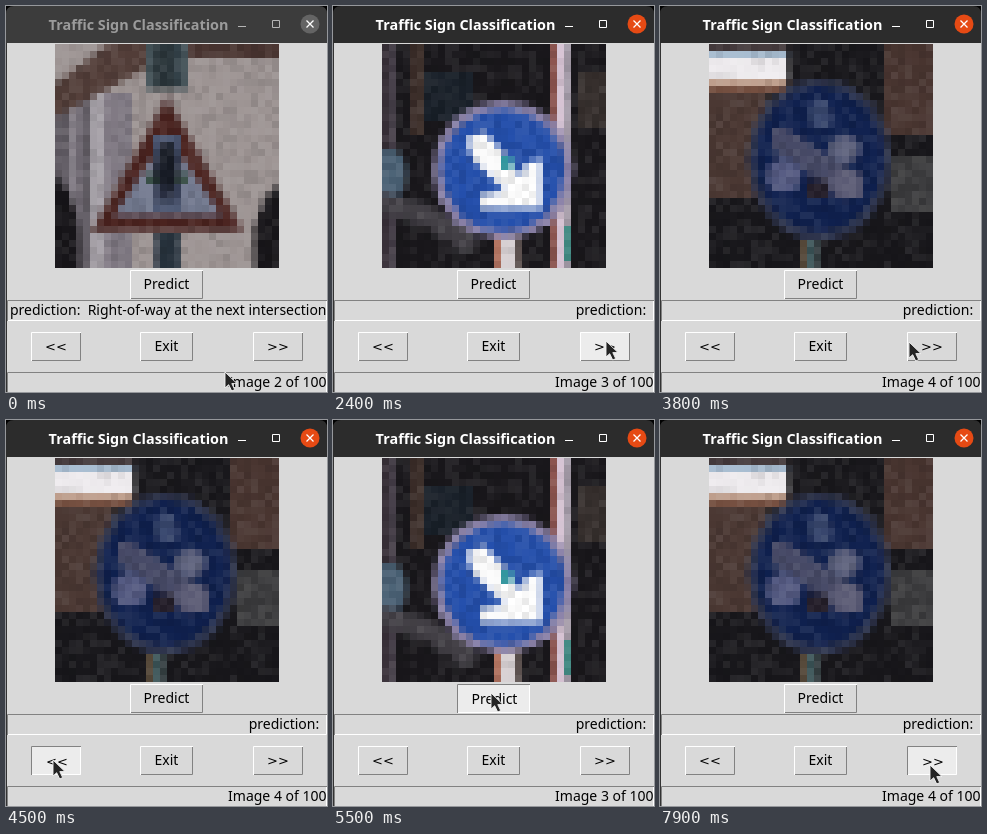
Recreate the animation shown at these times as an HTML page with a canvas. Size 321 by 386 pixels, loop 8 s.

```html
<!DOCTYPE html>
<html lang="en">
<head>
<meta charset="utf-8">
<title>Traffic Sign Classification</title>
<style>
html, body { margin: 0; width: 100%; height: 100%; overflow: hidden; background: #d9d9d9; }
canvas { position: absolute; left: 49px; top: 38px; width: 224px; height: 224px; image-rendering: pixelated; }
svg { position: absolute; left: 0; top: 0; }
text { font: 14px "Noto Sans", sans-serif; white-space: pre; }
.arrows { font: 13px "DejaVu Sans", sans-serif; }
#title { font: bold 14.4px "Noto Sans", sans-serif; }
</style>
</head>
<body>
<canvas id="photo" width="32" height="32"></canvas>
<svg id="ui" width="321" height="386" viewBox="0 0 321 386">
  <rect width="321" height="37" fill="#000"/>
  <path id="bar" d="M0 37V8Q0 0 8 0H313Q321 0 321 8V37Z"/>
  <rect y="37" width="1" height="349" fill="#333"/>
  <text id="title" x="132.5" y="23.5" text-anchor="middle">Traffic Sign Classification</text>
  <g id="icons" fill="none">
    <path d="M232 20.5H240M266.5 14.5H273.5V21.5H266.5Z"/>
    <circle id="close" cx="304" cy="18" r="9.5" stroke="none"/>
    <path d="M300.5 14.5l7 7m0 -7l-7 7" stroke="#fff" stroke-width="1.3"/>
  </g>
</svg>
<script>
const LOOP = 8000, STEP = 100, NS = 'http://www.w3.org/2000/svg';
const $ = id => document.getElementById(id);
const ui = $('ui'), ctx = $('photo').getContext('2d');

function add(tag, attrs, parent = ui) {
  const el = document.createElementNS(NS, tag);
  for (const k in attrs) el.setAttribute(k, attrs[k]);
  return parent.appendChild(el);
}

// Tk style box: a face with two-tone one pixel edges
function box(x, y, w, h) {
  const g = add('g', { fill: 'none' });
  const face = add('rect', { x, y, width: w, height: h, fill: '#d9d9d9' }, g);
  const lead = add('path', { d: `M${x + .5} ${y + h}V${y + .5}H${x + w}` }, g);
  const trail = add('path', { d: `M${x + 1} ${y + h - .5}H${x + w - .5}V${y + 1}` }, g);
  const relief = sunken => {
    lead.setAttribute('stroke', sunken ? '#828282' : '#fff');
    trail.setAttribute('stroke', sunken ? '#fff' : '#828282');
  };
  return { g, face, relief };
}

function button(label, x, y, w, font = '') {
  const { g, face, relief } = box(x, y, w, 29);
  const text = add('text', { x: x + w / 2, y: y + 19, 'text-anchor': 'middle', fill: '#000', class: font }, g);
  text.textContent = label;
  return (hot, down) => {
    relief(down);
    face.setAttribute('fill', hot ? '#ececec' : '#d9d9d9');
    text.setAttribute('transform', down ? 'translate(1 1)' : '');
  };
}

function field(y, h) {
  const { g, relief } = box(1, y, 320, h);
  relief(true);
  const text = add('text', { x: 320.5, y: y + 15, 'text-anchor': 'end', fill: '#000' }, g);
  return { g, text };
}

const predict = button('Predict', 124, 264, 73);
const result = field(294, 21);
const prev = button('<<', 25, 326, 50, 'arrows');
const exit = button('Exit', 134, 326, 53);
const next = button('>>', 247, 326, 50, 'arrows');
const footer = field(366, 22);
const cursor = add('path', {
  d: 'M0 0V16L3.7 12.7L6.7 19L9.7 17.6L6.8 11.6H12Z',
  fill: '#242424', stroke: '#f4f4f4', 'stroke-width': .9
});

// Photos are painted on a 32 x 32 grid and shown enlarged
function rect(color, x, y, w, h) { ctx.fillStyle = color; ctx.fillRect(x, y, w, h); }
function poly(color, ...p) {
  ctx.fillStyle = color;
  ctx.beginPath();
  for (let i = 0; i < p.length; i += 2) ctx.lineTo(p[i], p[i + 1]);
  ctx.fill();
}
function disc(color, x, y, rx, ry = rx) {
  ctx.fillStyle = color;
  ctx.beginPath();
  ctx.ellipse(x, y, rx, ry, 0, 0, 7);
  ctx.fill();
}
function pole(x, y, h, ...colors) {
  colors.forEach((c, i) => rect(c, x + i, y, 1, h));
}
function triangle(color, inset) {
  poly(color, 16, 7 + inset * 1.7, 27.3 - inset, 27 - inset * .7, 4.9 + inset, 27 - inset * .7);
}
function seeded(s) {
  return () => (s = s * 16807 % 2147483647) / 2147483647;
}
function grain(rnd, amount) {
  for (let i = 0; i < 1024; i++) {
    const v = rnd() < .5 ? 0 : 190;
    rect(`rgba(${v},${v},${v},${rnd() * amount})`, i % 32, i >> 5, 1, 1);
  }
}

const photos = {
  2(rnd) {
    rect('#9f9695', -4, -4, 40, 40);
    for (let x = 0; x < 11; x++) rect(`hsl(280 4% ${38 + 30 * rnd()}%)`, x, 7, 1, 30);
    poly('#18161a', -1, 18, 2, 21, 3.5, 26, 3.5, 33, -1, 33);
    poly('#18161a', 33, 19, 30, 22, 28.5, 26, 28.5, 33, 33, 33);
    poly('#543f3a', -1, 6.5, 9, -1, 14, -1, 14, 3, -1, 11);
    rect('#4b3632', 19, -1, 14, 3);
    pole(13, -1, 7.5, '#46545a', '#2f3b40', '#2b363b', '#2b363b', '#35434a', '#46545a');
    pole(14, 26, 7, '#4a505a', '#27323c', '#27323c', '#39434d');
    triangle('#756161', 0);
    triangle('#4b231f', .8);
    triangle('#747b91', 3.5);
    rect('#4d5873', 14, 13, 4, 11);
    rect('#30483f', 13, 18.5, 6, 1.5);
    disc('#181c26', 16, 18, 1.6, 4);
    rect('#2d3347', 14.5, 20.5, 3, 2);
  },
  3(rnd) {
    rect('#1a181c', -4, -4, 40, 40);
    pole(0, -1, 34, '#383038', '#453e48');
    pole(4, -1, 14, '#3a2c28', '#40322d');
    rect('#192029', 6, 4, 7, 7);
    rect('#37302e', 28, 4, 5, 8);
    disc('#4b6276', 1, 18.5, 2.5, 3.5);
    poly('#454248', -1, 21, 7, 23, 14, 28, 12, 30, 6, 26, -1, 24);
    pole(24, -1, 34, '#8d5550', '#d8c5d5', '#a9a0ad');
    pole(16, 27, 6, '#b57562', '#d9d2d4', '#d9d2d4', '#5e5351');
    disc('#8d84aa', 17.3, 18, 10.1);
    disc('#2550ad', 17.3, 18, 8.8);
    poly('#fff', 12, 13.5, 14.5, 12.5, 17, 15, 20, 19, 20.5, 17, 22.8, 16.5, 22.8, 23.5, 14, 23.5, 14, 21.5, 17.5, 21, 13, 16.5);
    rect('#29949d', 17, 16, 1.5, 2);
    rect('#428b84', 26, 26, 1, 5);
  },
  4(rnd) {
    rect('#19181c', -4, -4, 40, 40);
    rect('#4c3934', -1, 6, 9, 16);
    pole(8, 7, 13, '#38302f', '#2c2728');
    ['#443a3c', '#a9bed2', '#f0edf0', '#f0edf0', '#f0edf0', '#c1a08e', '#765041']
      .forEach((c, y) => rect(c, -1, y, 12.2, 1));
    rect('#4a3631', 25, -1, 8, 14);
    rect('#3c3c3e', 26, 16, 7, 8);
    pole(13, 28, 5, '#554839', '#3c5659', '#353f42');
    disc('#303750', 15.8, 16.5, 10.3, 11.5);
    disc('#10214f', 15.8, 16.5, 9.2, 10.4);
    disc('#39486f', 15.8, 10, 1.7, 2.3);
    poly('#484b68', 9, 12, 11, 12, 22, 19, 22, 22, 19, 22, 9, 15);
    disc('#626681', 19.3, 15, 2.4, 2);
    disc('#555b83', 10.7, 18.7, 2.5);
    disc('#5b5b75', 19.5, 20, 2.5, 2.2);
    rect('#251f2b', 14, 19.5, 3, 2.5);
  }
};

function paint(shot) {
  ctx.clearRect(0, 0, 32, 32);
  if (!shot) return;
  const rnd = seeded(shot * 977);
  ctx.filter = 'blur(.35px)';
  photos[shot](rnd);
  ctx.filter = 'none';
  grain(rnd, .1);
}

// Pointer moves: start, end, destination
const moves = [
  [600, 900, 262, 334], [1100, 1300, 273, 335], [3700, 4200, 47, 340], [4900, 5300, 158, 273],
  [6100, 6300, 225, 297], [6400, 6500, 267, 334], [6500, 6700, 270, 345]
];
const shots = [[0, 2], [2400, 3], [3400, 0], [3500, 4], [4600, 0], [4800, 3], [7200, 4]];
const results = [[0, 'Right-of-way at the next intersection'], [2400, ''], [5900, 'Keep right'], [7200, '']];

const at = (list, t) => list.filter(e => e[0] <= t).pop()[1];
const during = (t, ...spans) => spans.some(([a, b]) => t >= a && t < b);

function pointer(t) {
  const now = Math.floor(t / STEP) * STEP;
  let x = 219, y = 366;
  for (const [a, b, toX, toY] of moves) {
    const p = Math.min(1, Math.max(0, (now - a) / (b - a)));
    const k = p * p * (3 - 2 * p);
    x += (toX - x) * k;
    y += (toY - y) * k;
  }
  return [Math.round(x), Math.round(y)];
}

let shown;
function render(t) {
  const active = t >= 2200;
  $('bar').setAttribute('fill', active ? '#2c2c2c' : '#3c3c3c');
  $('title').setAttribute('fill', active ? '#fff' : '#9b9b9b');
  $('icons').setAttribute('stroke', active ? '#fff' : '#b5b5b5');
  $('close').setAttribute('fill', active ? '#e64a14' : '#646464');

  const shot = at(shots, t);
  if (shot !== shown) paint(shown = shot);
  footer.g.style.display = shot ? '' : 'none';
  footer.text.textContent = `Image ${shot} of 100`;
  result.text.textContent = 'prediction:  ' + at(results, t);

  predict(during(t, [5300, 6200]), during(t, [5500, 5900]));
  prev(during(t, [4200, 4600]), during(t, [4500, 4600]));
  exit(false, false);
  next(during(t, [900, 3800], [6300, LOOP]),
    during(t, [2200, 2400], [3200, 3400], [6900, 7200], [7900, LOOP]));

  cursor.setAttribute('transform', `translate(${pointer(t)})`);
}

const start = performance.now();
function tick() {
  render((performance.now() - start) % LOOP);
  requestAnimationFrame(tick);
}
tick();
</script>
</body>
</html>
```
